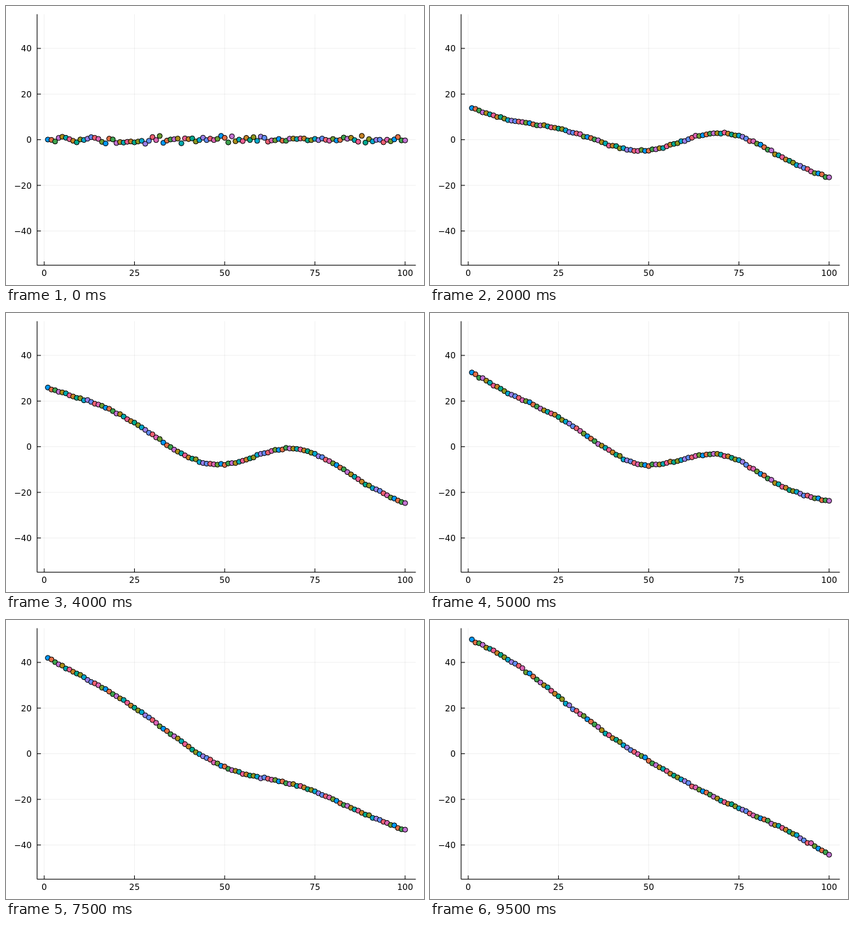
These frames come from a looping animation (600x400 px, 10 s). An HTML page:

```html
<!DOCTYPE html>
<html lang="en">
<head>
<meta charset="utf-8">
<title>Chain of points</title>
<style>
  html, body { margin: 0; width: 100%; height: 100%; overflow: hidden; background: #fff; }
  svg { display: block; width: 600px; height: 400px; }
  text { font: 12px "DejaVu Sans", sans-serif; fill: #000; }
  .grid { stroke: #000; stroke-opacity: .06; }
  .axis { stroke: #000; }
  circle { stroke: #000; }
</style>
</head>
<body>
<svg id="plot" viewBox="0 0 600 400"></svg>
<script>
const COUNT = 100, STEP = 500, STEPS = 20;
const COLORS = ['#009afa', '#e36f47', '#3ea44e', '#c371d2', '#ac8e18', '#00aaae', '#ed5e93', '#c68225',
  '#00a98d', '#8e971e', '#00a9cc', '#9b7fe9', '#618df6', '#f06073', '#dd65b6', '#6c9f33'];

// The chain is a straight line from head to tail, bent by a few sine waves
const KEYS = [
  { step: 0, head: 0, tail: 0, waves: [0, 0, 0, 0, 0] },
  { step: 4, head: 14, tail: -16.4, waves: [1.3, -6, 2.7, 1, -2] },
  { step: 8, head: 25.7, tail: -24.9, waves: [-2, -6.2, 4.4, 2.5, -1.6] },
  { step: 10, head: 32.6, tail: -23.5, waves: [-7.5, -4.7, 2.7, 2.1, -2.4] },
  { step: 13, head: 38.3, tail: -32.3, waves: [-5.7, -3.4, 3.3, .5, -1] },
  { step: 17, head: 45.5, tail: -34.5, waves: [-8.9, 2, 1.4, .9, -.5] },
  { step: 19, head: 49.8, tail: -44.3, waves: [-5.1, .6, 1.7, .3, .5] }
];

const plot = document.getElementById('plot');
const px = x => 54.9 + 5.18 * x;
const py = y => 191.7 - 3.272 * y;
const lerp = (a, b, t) => a + (b - a) * t;

function add(tag, attrs, text) {
  const node = document.createElementNS('http://www.w3.org/2000/svg', tag);
  for (const key in attrs) node.setAttribute(key, attrs[key]);
  if (text !== undefined) node.textContent = text;
  return plot.appendChild(node);
}

const line = (cls, x1, y1, x2, y2) => add('line', { class: cls, x1, y1, x2, y2 });

function drawAxes() {
  const left = px(-1.97), right = px(102.97), top = py(55), bottom = py(-55);
  for (let v = 0; v <= 100; v += 25) {
    line('grid', px(v), top, px(v), bottom);
    line('axis', px(v), bottom, px(v), bottom - 5.4);
    add('text', { x: px(v), y: 386.8, 'text-anchor': 'middle' }, v);
  }
  for (let v = -40; v <= 40; v += 20) {
    line('grid', left, py(v), right, py(v));
    line('axis', left, py(v), left + 5.4, py(v));
    add('text', { x: 36.8, y: py(v) + 4.4, 'text-anchor': 'end' }, String(v).replace('-', '\u2212'));
  }
  line('axis', left, bottom, right, bottom);
  line('axis', left, top, left, bottom);
}

function random(seed) {
  const s = Math.sin(seed * 12.9898) * 43758.5453;
  return s - Math.floor(s);
}

// Bell-shaped noise around zero
function jitter(step, k) {
  const seed = step * 307 + k * 3 + 1;
  return random(seed) + random(seed + 1) + random(seed + 2) - 1.5;
}

function poseAt(step) {
  const i = Math.max(1, KEYS.findIndex(key => key.step >= step));
  const a = KEYS[i - 1], b = KEYS[i];
  const t = (step - a.step) / (b.step - a.step);
  return {
    head: lerp(a.head, b.head, t),
    tail: lerp(a.tail, b.tail, t),
    waves: a.waves.map((w, n) => lerp(w, b.waves[n], t))
  };
}

function heights(step) {
  const { head, tail, waves } = poseAt(step);
  const spread = .4 + 1.3 * Math.exp(-step);
  return dots.map((_, k) => {
    const u = k / (COUNT - 1);
    const bend = waves.reduce((sum, w, n) => sum + w * Math.sin((n + 1) * Math.PI * u), 0);
    return lerp(head, tail, u) + bend + jitter(step, k) * spread;
  });
}

drawAxes();
const dots = Array.from({ length: COUNT }, (_, k) =>
  add('circle', { cx: px(k + 1), r: 3.6, fill: COLORS[k % COLORS.length] }));

let shown = -1;
function show(step) {
  if (step === shown) return;
  shown = step;
  heights(step).forEach((y, k) => dots[k].setAttribute('cy', py(y).toFixed(2)));
}

const start = performance.now();
function tick() {
  show(Math.floor((performance.now() - start) / STEP) % STEPS);
  requestAnimationFrame(tick);
}
tick();
</script>
</body>
</html>
```
